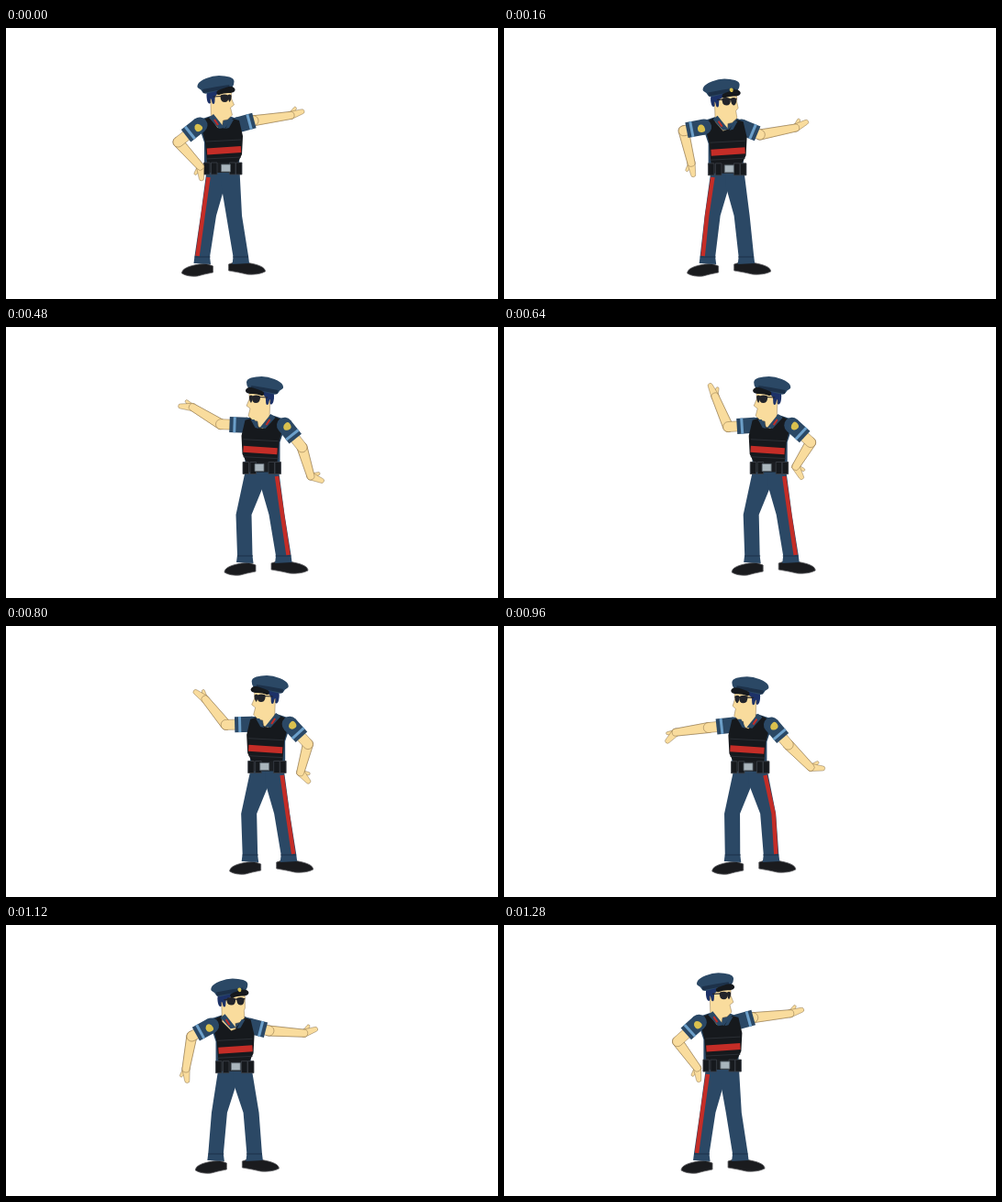
Animation, 536 px wide and 296 px high, one loop 1360 ms. Source, as an HTML page with a canvas:

```html
<!DOCTYPE html>
<html>
<head>
<meta charset="utf-8">
<style>
html, body { margin: 0; width: 100%; height: 100%; overflow: hidden; background: #fff; }
canvas { display: block; }
</style>
</head>
<body>
<canvas id="stage" width="536" height="296"></canvas>
<script>
const ctx = document.getElementById('stage').getContext('2d');
const STEP = 80, STEPS = 17, DEG = Math.PI / 180;
const BLUE = '#2b4865', DARK = '#1d3149', BLACK = '#16191d', RED = '#c42d27',
  SKIN = '#f9dc9d', PALE = '#6c9fc9', GOLD = '#d9c04e', EDGE = 'rgba(110,85,50,.5)';

function trace(p) {
  ctx.beginPath();
  for (let i = 0; i < p.length; i += 2) ctx.lineTo(p[i], p[i + 1]);
}

function paint(fill, edge) {
  ctx.closePath();
  ctx.fillStyle = fill;
  ctx.fill();
  if (!edge) return;
  ctx.strokeStyle = edge;
  ctx.lineWidth = .8;
  ctx.stroke();
}

function shape(p, fill, edge) {
  trace(p);
  paint(fill, edge);
}

function line(p, color, width) {
  trace(p);
  ctx.strokeStyle = color;
  ctx.lineWidth = width;
  ctx.stroke();
}

function box(x, y, w, h, fill, edge) {
  shape([x, y, x + w, y, x + w, y + h, x, y + h], fill, edge);
}

// Closed curve through the middles of the given polygon's sides.
function smooth(p, fill, edge) {
  const n = p.length, at = i => p[i % n];
  ctx.beginPath();
  for (let i = 0; i <= n; i += 2) {
    const mx = (at(i) + at(i + 2)) / 2, my = (at(i + 1) + at(i + 3)) / 2;
    if (i) ctx.quadraticCurveTo(at(i), at(i + 1), mx, my);
    else ctx.moveTo(mx, my);
  }
  paint(fill, edge);
}

// Tapered, round-ended skin segment; returns its far end.
function limb([x, y], angle, length, r1, r2) {
  const a = angle * DEG, q = Math.PI / 2;
  const end = [x + length * Math.cos(a), y + length * Math.sin(a)];
  ctx.beginPath();
  ctx.arc(x, y, r1, a + q, a - q);
  ctx.arc(...end, r2, a - q, a + q);
  paint(SKIN, EDGE);
  return end;
}

function arm(shoulder, elbow, { angle, length, bend, thumb }, badge) {
  const wrist = limb(elbow, angle, length, 5.5, 4);
  const hand = angle + bend;
  limb(wrist, hand + thumb * 40, 9, 3, 1.6);
  limb(wrist, hand, 13, 4.2, 2.6);
  limb(elbow, angle, length, 5.5, 4);

  const dx = elbow[0] - shoulder[0], dy = elbow[1] - shoulder[1];
  ctx.save();
  ctx.translate(...shoulder);
  ctx.rotate(Math.atan2(dy, dx));
  limb([12, 0], 0, Math.max(2, Math.hypot(dx, dy) - 12), 5.5, 5.5);
  ctx.beginPath();
  ctx.arc(0, 0, 8.5, 0, 7);
  paint(BLUE);
  box(0, -8.5, 19, 17, BLUE);
  box(12, -8.5, 3, 17, PALE);
  if (badge) smooth([-1, -6, 7, -5, 7, 1, 3, 4, -1, 1], GOLD);
  ctx.restore();
}

function shoe(heel, y, dir, length) {
  const px = u => heel + dir * length * u;
  ctx.beginPath();
  ctx.moveTo(px(0), y - 4);
  ctx.quadraticCurveTo(px(.2), y - 8, px(.45), y - 6);
  ctx.bezierCurveTo(px(.8), y - 4, px(1), y - 1, px(1), y + 4);
  ctx.quadraticCurveTo(px(.8), y + 8, px(.5), y + 7);
  ctx.quadraticCurveTo(px(.3), y + 5, px(0), y + 3);
  paint('#1a1b1e', '#5c5c60');
}

function leg(outer, inner, knee, ankle, side, striped) {
  shape([outer, 156, knee + side * 8.5, 205, ankle + side * 8.5, 249, ankle + side * 9.5, 257,
    ankle - side * 9, 258, ankle - side * 8, 250, knee - side * 8.5, 205, inner, 172, inner, 156], BLUE);
  line([ankle - 8.5, 250, ankle + 8.5, 250], DARK, 1);
  if (striped)
    line([outer - side * 2, 163, knee + side * 6, 205, ankle + side * 5.5, 249], RED, 4.5);
}

function torso(put, farArm) {
  shape(put([-26, 101, -8, 95, 12, 97, 22, 101, 20, 149, -18, 149, -18, 125]), BLUE);
  farArm();
  shape(put([-23, 102, -12, 97, 4, 110, 13, 99, 20, 101, 24, 118, 23, 138, 18, 148, -15, 148, -17, 125]), BLACK);
  line(put([-15, 135, 22, 132.5]), RED, 7);
  for (const y of [123, 142]) line(put([-16, y + 1, 22, y - 1]), '#2b2f35', 1);
}

function belt(x, y, f) {
  box(x - 20, y, 40, 11, '#1b1e22');
  for (const d of [-21, -13, 7, 14]) box(x + d, y, 6.5, 13, BLACK, '#3b4148');
  box(x - 5 + 3 * f, y + 2, 10, 8, '#a9b5bc', '#59636b');
}

// t runs from a frontal view (0) to a profile (1).
function head(put, t) {
  const back = -12 + 4 * t;
  smooth(put([back - 2, 66, 2, 66, 2, 72, back + 6, 75, back + 2, 84, back - 2, 80]), '#1d3268');
  shape(put([back + 2, 68, 17, 66, 17, 77, 16 + 4 * t, 84, 16, 87, 16 + 2 * t, 95, 10 + 3 * t, 100,
    6 + 2 * t, 101, 7, 107, 2, 109, back + 3, 99]), SKIN, EDGE);
  smooth(put([back - 1, 66, 3, 66, 2, 73, back + 7, 74, back + 7, 83, back + 4, 83, back + 3, 76, back - 2, 79]), '#1d3268');
  line(put([back + 5, 75, 17, 74]), '#22242a', 1.2);
  for (const [left, right] of [[-6 + 11 * t, 4 + 10 * t], [6 + 7 * t, 16 + t]])
    smooth(put([left, 72.5, right, 72.5, right, 78, right - 2, 81, left + 2, 81, left, 77]), '#22242a');
  smooth(put([-21, 65, -18, 58, -3, 52, 10, 52, 20, 55, 20, 62, 16, 67, 3, 68, -13, 73, -16, 67]), BLUE);
  line(put([-14, 69, 2, 66, 15, 64]), DARK, 4);
  smooth(put([0, 69, 8, 66, 17, 63, 22, 67, 19, 71, 8, 71, 2, 74]), BLACK);
  if (t < .8) smooth(put([9, 62, 13, 62, 13, 66, 11, 67, 9, 65]), GOLD);
}

function collar(put) {
  shape(put([-13, 98, -8, 94, 4, 109, -2, 110]), BLUE);
  shape(put([5, 110, 10, 100, 14, 100, 9, 109]), BLUE);
  line(put([-7, 100, -3, 106]), RED, 2);
}

function draw(step) {
  // The sway peaks on the right side of the stage at phase 0.
  const phase = 2 * Math.PI * (step - 8.4) / STEPS;
  const c = Math.cos(phase), s = Math.sin(phase);
  const c2 = Math.cos(2 * phase), s2 = Math.sin(2 * phase);

  const x = 220 + 28.5 * c;
  const f = Math.max(-1, Math.min(1, -.45 - 1.5 * c));
  const side = f < 0 ? -1 : 1, t = Math.abs(f), bob = 8 * (1 - t) + 1 - f;
  const chest = x + 40 + 2.5 * t * t, hip = x + 43 + 2 * f * t;
  const cap = x + 37 + 7 * Math.min(0, f) ** 2;
  const placer = (ox, dy) => p => p.map((v, i) => i % 2 ? v + dy : ox + side * v);

  const leftElbow = [x - 4, 113 - 8 * c + 5 * s + 4 * c2 - 3 * s2];
  const rightElbow = [x + 82 + 4 * c, 121.5 + 12.5 * c - 3 * s - 8 * c2 + 2 * s2];
  const left = { angle: 148 + 100 * c, length: 36, bend: 18 * (1 - c) - 55 * s * s, thumb: 1 };
  const right = { angle: 40 + 66 * c + 6 * s + 18 * c2, length: 36 - 5 * c, bend: -35 - 25 * c, thumb: -1 };
  const shoulderY = 106 + bob * .6;
  const drawArm = isLeft => {
    const near = isLeft === side > 0;
    const shoulder = [chest + side * (near ? -23 : 18), shoulderY];
    arm(shoulder, isLeft ? leftElbow : rightElbow, isLeft ? left : right, near);
  };

  ctx.fillStyle = '#fff';
  ctx.fillRect(0, 0, 536, 296);
  shoe(x + 34, 264, -1, 34);
  shoe(x + 51, 262, 1, 40);
  const bent = Math.max(0, -4 * f * (1 + f));
  leg(hip - 18, hip + 2, x + 25 + 4 * f, x + 22.5, -1, f > .3);
  leg(hip + 18, hip - 2, x + 61 - 4 * t * t + 4 * bent, x + 64, 1, f < -.3);
  torso(placer(chest, bob * .35), () => drawArm(side < 0));
  belt(hip, 147 + bob * .25, f);
  head(placer(cap, bob), t);
  collar(placer(chest, bob * .5));
  drawArm(side > 0);
}

function tick() {
  draw(Math.floor(performance.now() / STEP) % STEPS);
  requestAnimationFrame(tick);
}
ctx.lineJoin = 'round';
tick();
</script>
</body>
</html>
```
